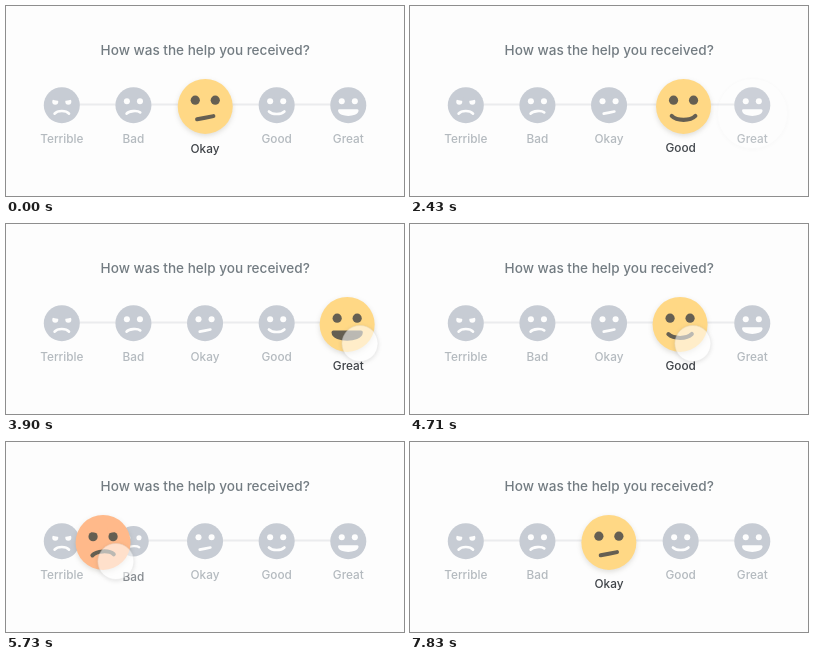
Animation, 398 px wide and 190 px high, one loop 7860 ms. Source, as an HTML page:

```html
<!DOCTYPE html>
<html lang="en">
<head>
<meta charset="utf-8">
<title>Feedback slider</title>
<style>
  html, body { margin: 0; width: 100%; height: 100%; overflow: hidden; background: #fdfdfd; }
  svg { display: block; width: 398px; height: 190px; }
  text { font-family: Inter, "Open Sans", sans-serif; font-weight: 500; text-anchor: middle; }
  .title { font-size: 13.55px; fill: #737c82; }
  .label { font-size: 11.8px; }
  .small { fill: #c7ccd4; }
  .small .ink { fill: #fdfdfd; stroke: #fdfdfd; }
  .small .lid { fill: #c7ccd4; }
  .ink { stroke-linecap: round; stroke-linejoin: round; }
  .big .ink { fill: #655f52; stroke: #655f52; }
  .ink.eye { stroke: none !important; }
  .big { filter: drop-shadow(0 2px 2.5px rgba(70, 60, 40, .16)); }
  .cursor { fill: #fff; stroke: #dcdcdc; stroke-width: .6; filter: drop-shadow(0 1px 2px rgba(60, 60, 60, .25)); }
</style>
</head>
<body>
<svg viewBox="0 0 398 190">
  <text class="title" x="199.2" y="49.4">How was the help you received?</text>
  <path d="M55.5 98.5H342" stroke="#ebecee" stroke-width="2"/>
  <g id="scale"></g>
  <g id="labels"></g>
  <g id="thumb"></g>
  <circle class="cursor" r="18"/>
</svg>
<script>
const LOOP = 7860, FIRST = 55.8, GAP = 71.625, SLIDE = 520, RIPPLE = 300;
const $ = q => document.querySelector(q);
const clamp = v => Math.min(1, Math.max(0, v));
const mix = (a, b, k) => a + (b - a) * k;
const mixAll = (a, b, k) => a.map((v, i) => mix(v, b[i], k));
const rgb = c => `rgb(${c.map(Math.round)})`;
const stop = i => FIRST + GAP * i;

// mouth: half width, corner y, control x, lower control y, upper control y, tilt; lid: how far it covers the eyes
const MOODS = [
  { name: 'Terrible', color: [255, 171, 143], mouth: [11, 13, 6.5, 7.6, 7.6, 0], lid: 1 },
  { name: 'Bad', color: [255, 196, 134], mouth: [10.5, 12, 6.5, 8, 8, -5], lid: 0 },
  { name: 'Okay', color: [255, 216, 133], mouth: [8.3, 11.3, 3, 11.3, 11.3, -11], lid: 0 },
  { name: 'Good', color: [255, 216, 133], mouth: [11.8, 9.6, 6.5, 14.8, 14.8, 0], lid: 0 },
  { name: 'Great', color: [255, 216, 133], mouth: [13.7, 8, 13.2, 16.6, 8, 0], lid: 0 }
];

const SLIDES = [[810, 2, 3], [2360, 3, 4], [7330, 0, 2]];
const DRAG = [[3800, 342.3], [3900, 341], [4110, 331], [4710, 270], [4920, 234], [5730, 97], [6300, FIRST]];
const TOUCHES = [
  { show: 440, end: 720, x: 273, y: 107.5 },
  { show: 2000, end: 2270, x: 342.5, y: 107.5 },
  { show: 3500, end: 6380, y: 119.5 },
  { show: 7060, end: 7240, x: 199, y: 107.5 }
];

function faceMarkup(cls) {
  const eye = s => `<circle class="ink eye" cx="${10 * s}" cy="-6.2" r="4.6"/>`;
  const lid = s => `<path class="lid" d="M${16 * s} -10Q${9 * s} -7.2 ${4 * s} -8V-13H${16 * s}Z"/>`;
  return `<g class="${cls}"><circle class="skin" r="27.5"/>
    <g class="eyes">${eye(-1)}${eye(1)}<g class="lids">${lid(-1)}${lid(1)}</g></g>
    <path class="mouth ink" stroke-width="4"/></g>`;
}

function setMood(el, mouth, lid) {
  const [x, y, cx, low, high, tilt] = mouth;
  const m = el.querySelector('.mouth');
  m.setAttribute('d', `M${-x} ${y}C${-cx} ${low} ${cx} ${low} ${x} ${y}C${cx} ${high} ${-cx} ${high} ${-x} ${y}Z`);
  m.setAttribute('transform', `rotate(${tilt} 0 ${y})`);
  el.querySelector('.eyes').setAttribute('transform', `translate(0 ${lid})`);
  el.querySelector('.lids').setAttribute('transform', `translate(0 ${-4 * (1 - lid)})`);
}

const place = (el, x, y, s) => el.setAttribute('transform', `translate(${x} ${y}) scale(${s})`);

$('#scale').innerHTML = MOODS.map(() => faceMarkup('small')).join('');
$('#labels').innerHTML = MOODS.map((m, i) => `<text class="label" x="${stop(i)}">${m.name}</text>`).join('');
$('#thumb').innerHTML = faceMarkup('big');
const smalls = [...document.querySelectorAll('.small')];
const labels = [...document.querySelectorAll('.label')];
const big = $('.big'), cursor = $('.cursor');
smalls.forEach((el, i) => setMood(el, MOODS[i].mouth, MOODS[i].lid));

const easeInOut = k => k < .5 ? 2 * k * k : 1 - 2 * (1 - k) ** 2;

// smooth curve through the drag points, at rest on both ends
function dragX(t) {
  const slope = i => i && i < DRAG.length - 1
    ? (DRAG[i + 1][1] - DRAG[i - 1][1]) / (DRAG[i + 1][0] - DRAG[i - 1][0]) : 0;
  const i = DRAG.findIndex(p => p[0] > t) - 1;
  const [t0, a] = DRAG[i], [t1, b] = DRAG[i + 1];
  const d = t1 - t0, k = (t - t0) / d, k2 = k * k, k3 = k2 * k;
  return a * (2 * k3 - 3 * k2 + 1) + b * (3 * k2 - 2 * k3)
    + d * (slope(i) * (k3 - 2 * k2 + k) + slope(i + 1) * (k3 - k2));
}

function thumbX(t) {
  const end = DRAG[DRAG.length - 1][0];
  if (t >= DRAG[0][0] && t < end) return dragX(t);
  let x = t >= end ? FIRST : stop(2);
  for (const [start, from, to] of SLIDES)
    if (t >= start && (t < end || start > end))
      x = mix(stop(from), stop(to), easeInOut(clamp((t - start) / SLIDE)));
  return x;
}

function drawCursor(t, x) {
  const touch = TOUCHES.find(p => t >= p.show && t < p.end + RIPPLE);
  cursor.style.opacity = 0;
  if (!touch) return;
  const out = clamp((t - touch.end) / RIPPLE);
  cursor.setAttribute('cx', touch.x || x + 13);
  cursor.setAttribute('cy', touch.y);
  cursor.setAttribute('r', 18 + 19 * (1 - (1 - out) ** 3));
  cursor.style.opacity = .56 * clamp((t - touch.show) / 180) * (1 - out) ** 2.4;
}

function draw(t) {
  const x = thumbX(t);
  const at = Math.min(4, Math.max(0, (x - FIRST) / GAP));
  const i = Math.min(3, Math.floor(at)), k = at - i;
  const a = MOODS[i], b = MOODS[i + 1];
  const color = rgb(mixAll(a.color, b.color, k));

  place(big, x + .2, 100.4, 1);
  big.querySelector('.skin').style.fill = color;
  big.querySelectorAll('.lid').forEach(l => l.style.fill = color);
  setMood(big, mixAll(a.mouth, b.mouth, k), mix(a.lid, b.lid, k));

  MOODS.forEach((m, n) => {
    const near = 1 - clamp(Math.abs(x - stop(n)) / 36);
    place(smalls[n], stop(n), 99.2, 18 / 27.5 * (1 - near));
    labels[n].setAttribute('y', 137.3 + 9.2 * near);
    labels[n].style.fill = rgb(mixAll([180, 186, 191], [62, 66, 71], Math.sqrt(near)));
  });
  drawCursor(t, x);
}

const begin = performance.now();
function tick() {
  draw((performance.now() - begin) % LOOP);
  requestAnimationFrame(tick);
}
tick();
</script>
</body>
</html>
```
